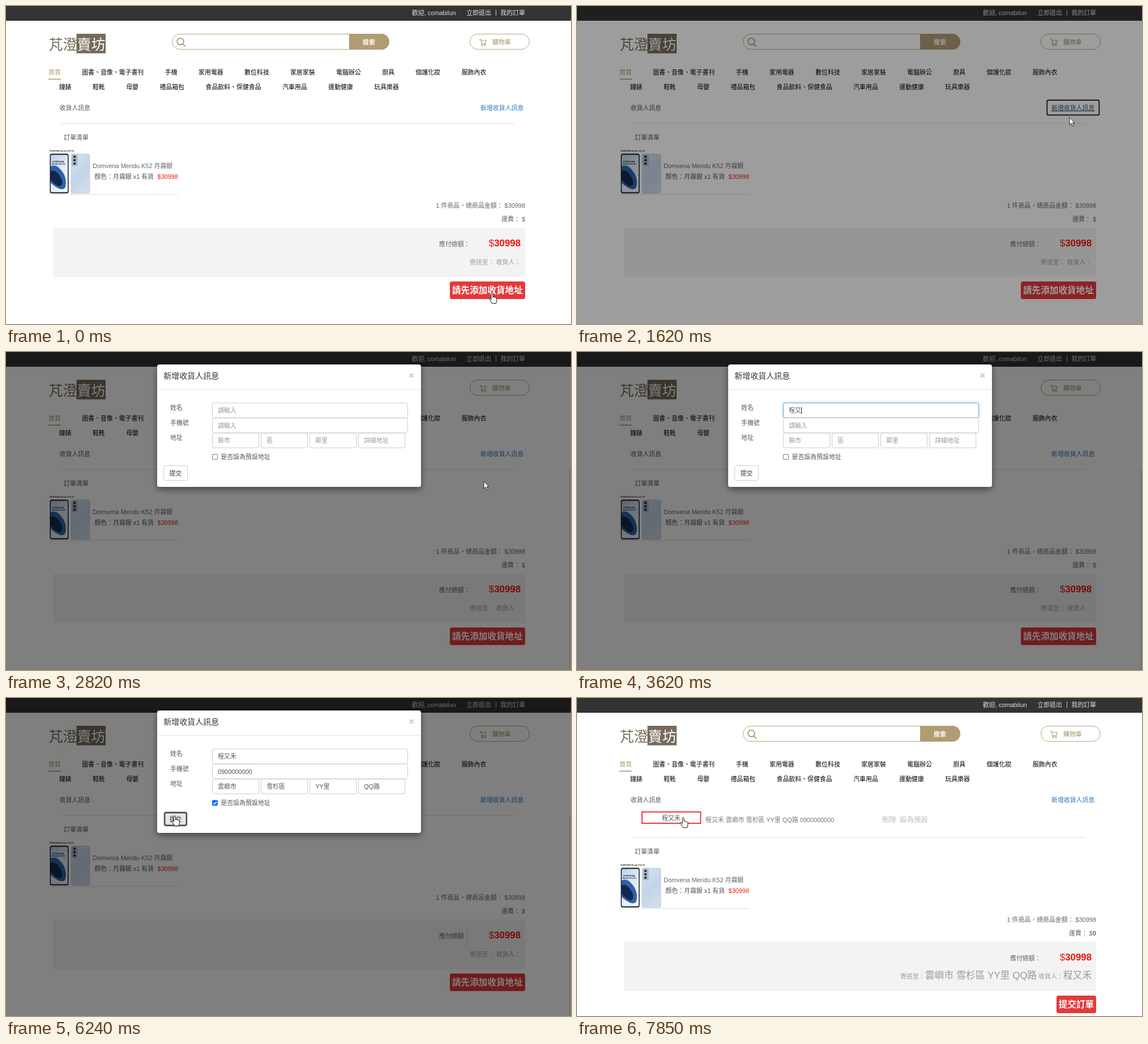
Write an HTML page that moves like this. It is 998x561 px and loops after 8 s.

```html
<!DOCTYPE html>
<html lang="zh-Hant">
<head>
<meta charset="utf-8">
<title>結帳</title>
<style>
html, body { margin: 0; width: 100%; height: 100%; overflow: hidden; background: #fff; }
svg { display: block; width: 998px; height: 561px; }
text { font-family: "Liberation Sans", "Noto Sans CJK TC", sans-serif; white-space: pre; }
</style>
</head>
<body>
<svg id="stage" viewBox="0 0 998 561" xmlns="http://www.w3.org/2000/svg"></svg>
<script>
const EM = 10.92, GOLD = '#b19c74', RED = '#e4393c';
const buyer = '程又禾', phone = '0900000000';
const address = ['雲嶼市', '雪杉區', 'YY里', 'QQ路'];
const device = 'Domvena Meridu K52', shade = '月霧銀';

// y is the middle of the line of text
const text = (x, y, str, fill = '#555', size = EM, more = '') =>
  `<text x="${x}" y="${y + size * 0.38}" font-size="${size}" fill="${fill}" ${more}>${str}</text>`;
const rect = (x, y, w, h, fill, more = '') =>
  `<rect x="${x}" y="${y}" width="${w}" height="${h}" fill="${fill}" ${more}/>`;
const group = (id, body, more = '') => `<g id="${id}" ${more}>${body}</g>`;
const line = (x1, x2, y, color = '#ddd', w = 1) =>
  `<path d="M${x1} ${y}H${x2}" stroke="${color}" stroke-width="${w}"/>`;
const END = 'text-anchor="end"', BOLD = 'font-weight="700"';

function navRow(x, y, labels) {
  return labels.map(label => {
    const out = text(x.toFixed(1), y, label, label === '首頁' ? GOLD : '#000', EM, 'font-weight="500"');
    x += label.length * EM + 37.4;
    return out;
  }).join('');
}

function header() {
  return rect(0, 0, 998, 26, '#333') +
    text(717, 12, '歡迎, comabilun', '#ddd') +
    text(813.3, 12, '立即退出', '#ddd') +
    rect(865, 6.5, 1, 10.5, '#ccc') +
    text(873.3, 12, '我的訂單', '#ddd') +
    text(75.5, 67, '芃澄', '#766b5b', 25) +
    rect(124.5, 49, 51.5, 34.5, '#766b5b') +
    text(125.5, 67, '賣坊', '#fff', 25) +
    rect(293.5, 49.5, 383, 27, '#fff', `rx="13.5" stroke="${GOLD}" stroke-width=".9"`) +
    `<path d="M606 49H663a14 14 0 0 1 0 28H606Z" fill="${GOLD}"/>` +
    `<g fill="none" stroke="#a08a62" stroke-width="1.5" stroke-linecap="round">
      <circle cx="308" cy="62.5" r="5.8"/><path d="M312.3 67L316.8 71.5"/></g>` +
    text(630, 63.8, '搜索', '#fff', EM, BOLD) +
    rect(819.5, 49.5, 105, 27, '#fff', `rx="13.5" stroke="${GOLD}" stroke-width=".9"`) +
    `<g fill="none" stroke="${GOLD}" stroke-width="1.1">
      <path d="M836 58.5h2.3l2 8h6.2l1.5-5.8h-9"/><circle cx="841" cy="69" r="1.1"/><circle cx="846" cy="69" r="1.1"/></g>` +
    text(859, 63.8, '購物車', '#a8946a') +
    navRow(75, 117, ['首頁', '圖書、音像、電子書刊', '手機', '家用電器', '數位科技', '家居家裝', '電腦辦公', '廚具', '個護化妝', '服飾內衣']) +
    line(75, 97, 129, GOLD, 1.6) +
    navRow(93.7, 142.5, ['鐘錶', '鞋靴', '母嬰', '禮品箱包', '食品飲料、保健食品', '汽車用品', '運動健康', '玩具樂器']) +
    text(94.5, 179.5, '收貨人訊息') +
    text(838, 179.5, '新增收貨人訊息', '#2a78bd', EM, 'id="link"') +
    group('ring', rect(830.3, 166.2, 92, 26.2, 'none', 'rx="2.5" stroke="#101010" stroke-width="1.7"'));
}

function photo() {
  const tiny = (x, y, str, fill, size) => text(x, y, str, fill, size, BOLD);
  const lenses = [266, 272, 278].map(y => `<circle cx="121" cy="${y}" r="2.1" fill="#1d2230"/>`).join('');
  return tiny(77, 256, 'DOMVENA Meridu K52 5G', '#333', 3.5) +
    rect(77.5, 260.5, 33, 70, '#15171c', 'rx="3.5"') +
    rect(79, 262.5, 30, 66, 'url(#screen)', 'rx="2"') +
    `<path d="M79 283C88 278 95 286 100 293S108 312 104 321C98 327 88 320 79 312Z" fill="#2f62a8"/>
     <path d="M79 291C87 288 93 296 97 303S100 317 95 318C89 318 84 311 79 307Z" fill="#10284f"/>` +
    tiny(82, 274, 'DOMVENA', '#1c2f50', 4) +
    tiny(81, 279, 'Meridu K52 5G', '#1c2f50', 3.4) +
    rect(115, 261, 33, 69.5, 'url(#back)', 'rx="3.5" stroke="#b4c2d2" stroke-width=".7"') +
    rect(116, 262, 10.5, 20.5, '#a9b8ca', 'rx="2.5"') + lenses;
}

function order() {
  return line(98, 898, 207) +
    text(102, 232, '訂單清單') + photo() +
    line(75, 304, 332.3) +
    text(153, 281.5, `${device} ${shade}`, '#666') +
    text(156.3, 301, `顏色：${shade} x1 有貨`) +
    text(304, 301, '$30998', '#e8220f', EM, END) +
    text(917, 352.3, '1 件商品，總商品金額： $30998', '#666', EM, END) +
    text(917, 376, '運費： $<tspan id="fee" font-weight="700"></tspan>', '#666', EM, END) +
    rect(83, 391, 834, 87, '#f3f3f3') +
    text(765, 420, '應付總額：', '#666') +
    text(909, 418, `$<tspan ${BOLD}>30998</tspan>`, '#f2140c', 16.85, END) +
    group('unsent',
      text(819, 452.3, '寄送至： 收貨人：', '#999') +
      rect(784, 486, 133, 31, RED, 'rx="3.5"') +
      text(788, 501.5, '請先添加收貨地址', '#fff', 15.6, BOLD)) +
    group('sent',
      text(909.4, 452, `寄送至：<tspan font-size="16.85">${address.join(' ')}</tspan> 收貨人：<tspan font-size="16.85">${buyer}</tspan>`, '#999', EM, END) +
      rect(847, 486, 70, 31, RED, 'rx="3.5"') +
      text(850.8, 501.5, '提交訂單', '#fff', 15.6, BOLD));
}

function recipient() {
  return rect(114.8, 201, 103.6, 20, '#fff', 'stroke="#ee1c1c" stroke-width="1.7"') +
    text(150, 212, buyer) +
    text(227, 214.5, `${buyer} ${address.join(' ')} ${phone}`, '#777') +
    text(539, 214.5, '刪除', '#bbb', 12.48) +
    text(570, 214.5, '設為預設', '#bbb', 12.48);
}

const fields = [[364.5, 90, 345], [364.5, 116.5, 345], ...[0, 1, 2, 3].map(i => [364.5 + i * 86, 143, 82.3])];

function modal() {
  const boxes = fields.map(([x, y, w], i) =>
    rect(x, y, w, 26, '#fff', `id="box${i}" rx="3" stroke="#ccc"`) +
    text(x + 9.7, y + 13, '', '#999', EM, `id="val${i}"`)).join('');
  return rect(267, 22, 466, 216, '#fff', 'rx="4" filter="url(#shadow)"') +
    text(278.3, 42, '新增收貨人訊息', '#333', 14) +
    text(716.3, 41, '×', '#c4c4c4', 16.5, BOLD + ' text-anchor="middle"') +
    line(267, 733, 66, '#e5e5e5') +
    text(290, 98, '姓名') + text(290, 124.5, '手機號') + text(290, 151, '地址') +
    boxes +
    rect(364.5, 180.5, 9, 9, '#fff', 'id="check" rx="1.5" stroke="#767676"') +
    `<path id="tick" d="M366.3 185.2l2 2 3.7-4.3" fill="none" stroke="#fff" stroke-width="1.5"/>` +
    text(379.5, 185, '是否設為預設地址') +
    rect(278.5, 200.5, 42, 26, '#fff', 'id="send" rx="3" stroke="#ccc"') +
    group('sendRing',
      rect(279.3, 201.3, 40.4, 24.4, 'none', 'rx="2.5" stroke="#fff" stroke-width=".8"') +
      rect(280.4, 202.4, 38.2, 22.2, 'none', 'rx="2" stroke="#101010" stroke-width="1.6"')) +
    text(288.7, 213.7, '提交', '#333') +
    `<path id="caret" stroke="#222"/>`;
}

const defs = `<defs>
  <linearGradient id="screen" x2=".5" y2="1"><stop offset="0" stop-color="#b9d0ea"/><stop offset=".5" stop-color="#dfe9f4"/><stop offset="1" stop-color="#f0f4f9"/></linearGradient>
  <linearGradient id="back" x2=".5" y2="1"><stop offset="0" stop-color="#d8e3ef"/><stop offset=".6" stop-color="#c3d5e9"/><stop offset="1" stop-color="#cfdcea"/></linearGradient>
  <linearGradient id="side"><stop offset="0" stop-opacity="0"/><stop offset="1" stop-opacity=".12"/></linearGradient>
  <filter id="shadow" x="-10%" y="-20%" width="120%" height="140%"><feDropShadow dx="0" dy="4" stdDeviation="6" flood-opacity=".5"/></filter>
  <filter id="glow" x="-10%" y="-40%" width="120%" height="180%"><feDropShadow dx="0" dy="0" stdDeviation="2" flood-color="#66afe9" flood-opacity=".7"/></filter>
</defs>`;

const cursors =
  `<g fill="#fff" stroke="#111" stroke-linejoin="round">
    <path id="arrow" d="M0 0V13L3 10.3 5.2 15.3 7.4 14.3 5.2 9.6H9Z" stroke-width=".9"/>
    <path id="hand" d="M-1.5 1.5a1.5 1.5 0 0 1 3 0v5.3c.5-1 2.4-.8 2.6.4.6-.8 2.1-.5 2.3.6.7-.6 2 0 2 1.2v3.7c0 1.5-1.2 3-1.2 5h-7.4c0-1.2-1.2-2.2-2-3.6l-2.6-4c-.8-1.4 1-2.4 2-1.2l1.3 1.6Z" stroke-width="1"/>
    <path id="beam" d="M-2.5-8H2.5M0-8V8M-2.5 8H2.5" stroke-width="1"/>
  </g>`;

const stage = document.getElementById('stage');
stage.innerHTML = defs + rect(0, 0, 998, 561, '#fff') + header() +
  group('recipient', recipient()) + group('order', order()) +
  rect(0, 0, 998, 561, '#000', 'id="veil"') +
  rect(993, 208, 5, 353, 'url(#side)', 'id="edge"') +
  group('modal', modal()) + cursors;

const $ = id => document.getElementById(id);
const show = (id, on) => $(id).setAttribute('display', on ? 'inline' : 'none');
const set = (id, attrs) => { for (const k in attrs) $(id).setAttribute(k, attrs[k]); };
const at = (steps, t) => steps.filter(s => s[0] <= t).pop().slice(1);

const pointer = [
  [0, 'hand', 858.5, 507], [600, 'arrow', 864, 452], [800, 'arrow', 870, 350],
  [1000, 'arrow', 875, 245], [1200, 'hand', 876, 180], [1400, 'hand', 876, 180],
  [1620, 'arrow', 870, 196.5], [1820, ''], [2020, 'arrow', 870, 197],
  [2420, 'arrow', 866, 208], [2620, 'arrow', 858, 219], [2820, 'arrow', 844, 228],
  [3020, 'arrow', 660, 184], [3220, 'arrow', 470, 124], [3420, 'beam', 378, 92],
  [3620, ''], [6240, 'hand', 298, 208], [6640, 'arrow', 298, 208],
  [7050, 'arrow', 288, 214], [7250, 'arrow', 256, 216], [7450, 'arrow', 224, 209],
  [7650, 'hand', 197, 204], [7850, 'hand', 187.5, 211]
];
const veil = [[0, 0], [1620, 0.385], [1820, 0.5], [6640, 0]];
const nameTyped = [[0, 0], [3620, 2], [3820, 3]];
const phoneTyped = [[0, 0], [5240, 4], [5440, 7], [5640, 10]];
const focused = [[0, -1], [3620, 0], [4640, -1], [5040, 1], [6240, -1]];
const hints = ['請輸入', '請輸入', '縣市', '區', '鄰里', '詳細地址'];

function render(t) {
  const open = t >= 1820 && t < 6640, done = t >= 6640, filled = t >= 6240;
  const linkFocus = t >= 1400 && t < 2020, linkHover = t >= 1200 && t < 2020;

  set('link', { fill: linkHover ? '#23527c' : '#2a78bd', 'text-decoration': linkHover ? 'underline' : 'none' });
  show('ring', linkFocus);
  show('recipient', done);
  show('sent', done);
  show('unsent', !done);
  $('fee').textContent = done ? '0' : '';
  set('order', { transform: `translate(0 ${done ? 39 : 0})` });
  set('veil', { opacity: at(veil, t)[0] });
  show('edge', t >= 2420 && t < 6640);

  show('modal', open);
  set('modal', t < 2020 ? { opacity: 0.88, transform: 'translate(0 -20.5)' } : { opacity: 1, transform: '' });
  const typed = [buyer.slice(0, at(nameTyped, t)[0]), phone.slice(0, at(phoneTyped, t)[0]),
    ...address.map(part => filled ? part : '')];
  const focus = at(focused, t)[0];
  fields.forEach((f, i) => {
    $('val' + i).textContent = typed[i] || hints[i];
    set('val' + i, { fill: typed[i] ? '#555' : '#999' });
    set('box' + i, { stroke: focus === i ? '#66afe9' : '#ccc', filter: focus === i ? 'url(#glow)' : 'none' });
  });
  show('caret', focus >= 0 && !(t >= 4220 && t < 4640));
  if (focus >= 0) {
    const wide = focus === 0 ? EM : EM * 0.556;
    const [x, y] = fields[focus];
    set('caret', { d: `M${Math.round(x + 9.7 + typed[focus].length * wide) + 0.5} ${y + 7}v12` });
  }
  set('check', { fill: filled ? '#0075ff' : '#fff', stroke: filled ? '#0075ff' : '#767676' });
  show('tick', filled);
  set('send', { fill: filled ? '#e6e6e6' : '#fff', stroke: filled ? '#adadad' : '#ccc' });
  show('sendRing', filled);

  const [kind, x, y] = at(pointer, t);
  for (const id of ['arrow', 'hand', 'beam']) show(id, id === kind);
  if (kind) set(kind, { transform: `translate(${x} ${y})` });
}

const start = performance.now();
function tick(now) {
  render(Math.max(0, now - start) % 8000);
  requestAnimationFrame(tick);
}
render(0);
requestAnimationFrame(tick);
</script>
</body>
</html>
```
